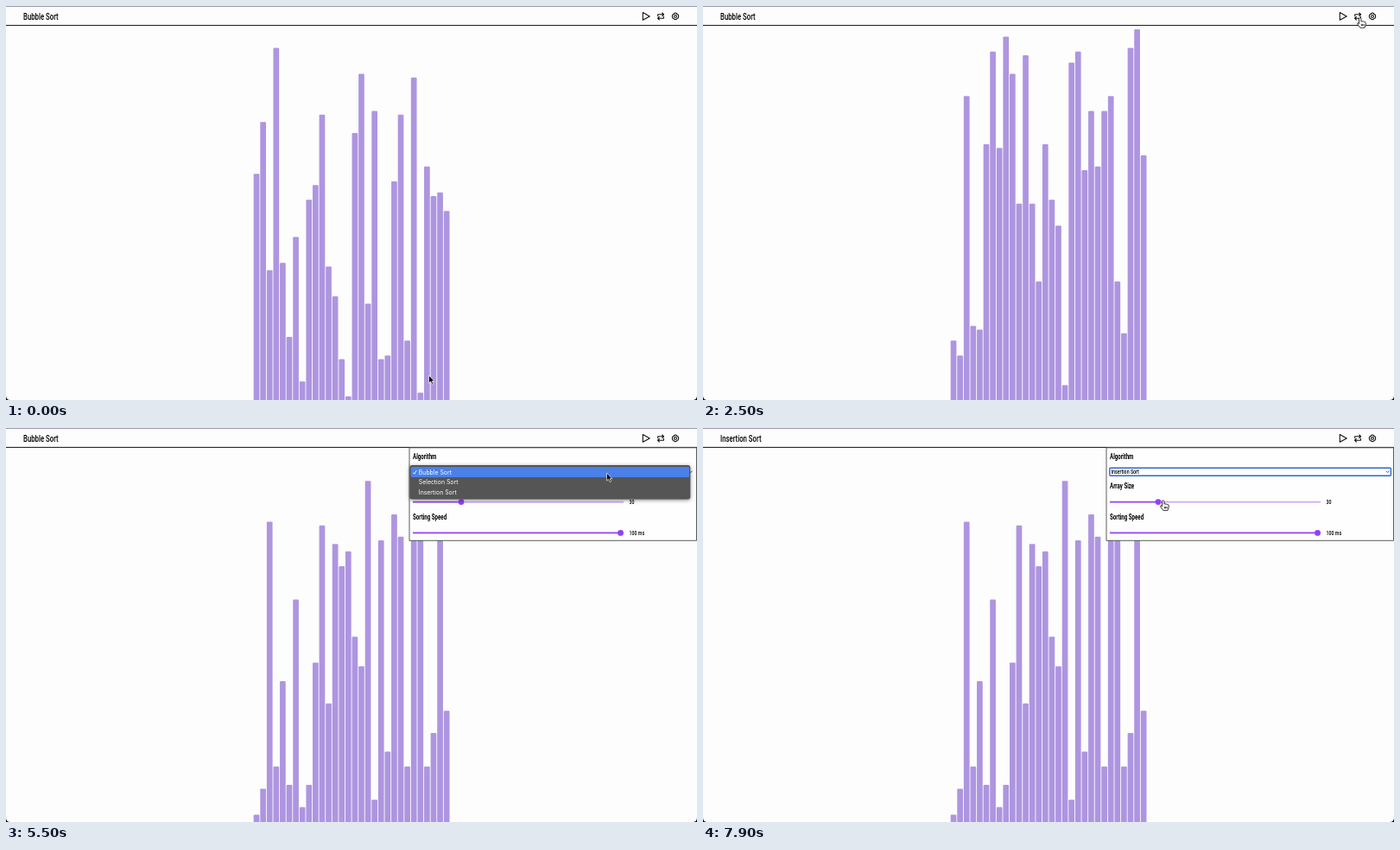
Animation, 800 px wide and 456 px high, one loop 8000 ms. Source, as an HTML page:

```html
<!DOCTYPE html>
<html lang="en">
<head>
<meta charset="utf-8">
<title>Sorting visualizer</title>
<style>
  html, body { margin: 0; width: 100%; height: 100%; overflow: hidden; background: #fdfdfd; }
  svg { display: block; width: 800px; height: 456px; }
  .condensed text { font-family: Roboto, sans-serif; transform-box: fill-box; transform: scaleX(.707); }
  .title { font-size: 11px; font-weight: 500; }
  .label { font-size: 8.7px; font-weight: 700; }
  .value { font-size: 7.5px; font-weight: 500; }
  .icon { fill: none; stroke: #111; stroke-width: 1.1; stroke-linejoin: round; stroke-linecap: round; }
  .track { stroke: #9340f5; stroke-width: 1.8; }
  .rest { stroke: #cfa6fa; }
  .thumb { fill: #9340f5; }
  #menu { font: 6.9px Inter, sans-serif; fill: #fff; filter: drop-shadow(0 1.5px 2px #0007); }
</style>
</head>
<body>
<svg viewBox="0 0 800 456">
  <rect width="800" height="456" fill="#fdfdfd"/>
  <g id="bars" fill="#ae95e0"></g>
  <path d="M0 .5H800" stroke="#9a9ab2"/>
  <path d="M0 22.4H800" stroke="#111"/>
  <g class="condensed"><text id="title" class="title" x="20" y="16">Bubble Sort</text></g>
  <g class="icon">
    <path d="M737.3 7.6V16.2L745.2 11.9Z"/>
    <path d="M754.7 11.6V9.8H761.3M759.8 8l1.8 1.8-1.8 1.7M761.4 12.3V14.2H754.7M756.3 12.5l-1.8 1.7 1.8 1.8"/>
    <path d="M773.6 8.6l1.4-.5 1.4.5.6 1 1.2.4.5 1.9-.5 2-1.2.4-.6 1-1.4.5-1.4-.5-.6-1-1.2-.4-.5-2 .5-1.9 1.2-.4Z"/>
    <circle cx="775" cy="11.9" r="1.4"/>
  </g>

  <g id="panel">
    <path d="M467 22.8H799.5V130.3H467Z" fill="#fefefe" stroke="#333" stroke-width=".8"/>
    <rect id="focus" x="470.8" y="46.2" width="325.6" height="9" rx="1" fill="#fff" stroke="#2f66cf" stroke-width="1.4"/>
    <g class="condensed">
      <text class="label" x="471" y="36">Algorithm</text>
      <text class="label" x="471" y="70">Array Size</text>
      <text class="label" x="471" y="106">Sorting Speed</text>
      <text id="choice" class="value" x="472.5" y="53.4">Bubble Sort</text>
      <text class="value" x="721.5" y="88.3">30</text>
      <text class="value" x="721.5" y="124.2">100 ms</text>
    </g>
    <path d="M791 49.8l1.7 1.7 1.7-1.7" fill="none" stroke="#222" stroke-width=".8"/>
    <path class="track rest" d="M527 85.6H715"/>
    <path class="track" d="M471 85.6H527M471 121.4H715"/>
    <circle class="thumb" cx="527" cy="85.6" r="3.4"/>
    <circle class="thumb" cx="711.5" cy="121.4" r="3.4"/>
  </g>

  <g id="menu">
    <rect x="467.3" y="43" width="325" height="39.5" rx="3" fill="#555"/>
    <rect id="hover" x="468.8" width="322.3" height="11.8" rx="1.5" fill="#4a80e8"/>
    <path d="M471.4 51.6l1.4 1.7 2.4-4.3" fill="none" stroke="#fff" stroke-width=".9"/>
    <text x="477.8" y="53.5">Bubble Sort</text>
    <text x="477.8" y="65.2">Selection Sort</text>
    <text x="477.8" y="76.9">Insertion Sort</text>
  </g>

  <path d="M0 451V456H5Q0 456 0 451ZM800 451V456H795Q800 456 800 451Z"/>
  <g id="cursor" stroke-linejoin="round">
    <path id="arrow" d="M0 0V9L2.1 7.1 3.6 10.5 5.1 9.8 3.6 6.6H6.4Z" stroke="#fff" stroke-width=".7"/>
    <path id="hand" d="M-1.2 1q1.2-1.8 2.4 0V4.4q1.2-.7 1.9.2 1.1-.5 1.8.4 1.6-.3 1.6 1.2V8.5L5.3 11.8H.2L-3 7.6q-.5-1.6 1-1.2L-1.2 7.2ZM1.6 7.4V9.7M3 7.4V9.7M4.4 7.4V9.7" fill="#fff" stroke="#111" stroke-width=".85"/>
  </g>
</svg>
<script>
const LOOP = 8000, STEP = 100, COUNT = 30, FLOOR = 456, UNIT = 4.29;
const $ = id => document.getElementById(id);
const show = (id, on) => $(id).style.display = on ? '' : 'none';

const shuffled = seed => Array.from({ length: COUNT }, (_, i) => {
  const n = Math.sin((i + 1) * 12.9898 + seed * 78.233) * 43758.5453;
  return Math.ceil((n - Math.floor(n)) * 100);
});

// The two arrays that stay on screen; the quick shuffles between them are random
const first = [61, 75, 35, 95, 37, 17, 44, 5, 54, 58, 77, 36, 28, 11, 1, 72, 88, 26, 78, 11, 12, 59, 77, 16, 87, 2, 63, 55, 56, 51];
const last = [2, 9, 81, 15, 38, 10, 60, 4, 10, 43, 80, 32, 75, 69, 73, 50, 42, 92, 6, 76, 19, 83, 77, 15, 83, 76, 15, 24, 91, 30];
const valuesAt = t =>
  t < 2100 ? first :
  t < 2500 ? shuffled(3) :
  t < 2700 ? shuffled(5) :
  t < 3000 ? shuffled(8) : last;

// Cursor moves: start, end, x and y of the tip on arrival
const moves = [
  [700, 1100, 764, 128],
  [1200, 1800, 760.7, 13.4],
  [3200, 3700, 775, 14],
  [4200, 4800, 696, 46.8],
  [5200, 6200, 693.6, 71],
  [6500, 7000, 702, 85],
  [7000, 7900, 532.7, 83.6],
];

function cursorAt(t) {
  let x = 489.5, y = 427.5;
  for (const [start, end, toX, toY] of moves) {
    const u = Math.min(1, Math.max(0, (t - start) / (end - start)));
    const ease = u * u * (3 - 2 * u);
    x += (toX - x) * ease;
    y += (toY - y) * ease;
  }
  return [x, y];
}

const bars = Array.from({ length: COUNT }, (_, i) => {
  const bar = document.createElementNS('http://www.w3.org/2000/svg', 'rect');
  const attrs = { x: 286.7 + i * 7.59, width: 6.7, rx: 1 };
  for (const name in attrs) bar.setAttribute(name, attrs[name]);
  return $('bars').appendChild(bar);
});

function render(t) {
  const values = valuesAt(t);
  bars.forEach((bar, i) => {
    bar.setAttribute('y', FLOOR - values[i] * UNIT);
    bar.setAttribute('height', values[i] * UNIT + 4);
  });

  const chosen = t >= 6400;
  show('panel', t >= 4000);
  show('menu', t >= 5000 && !chosen);
  show('focus', chosen);
  $('title').textContent = $('choice').textContent = chosen ? 'Insertion Sort' : 'Bubble Sort';

  const [x, y] = cursorAt(t);
  const row = y < 57 ? 0 : y < 68.5 ? 1 : 2;
  $('hover').setAttribute('y', 45.1 + row * 11.7);

  const onIcon = y < 19 && (Math.abs(x - 758) < 6 || Math.abs(x - 775) < 6);
  const onSlider = chosen && x < 715 && y > 81 && y < 90;
  show('hand', onIcon || onSlider);
  show('arrow', !(onIcon || onSlider));
  $('cursor').setAttribute('transform', `translate(${x} ${y})`);
}

function frame() {
  render(Math.floor(performance.now() % LOOP / STEP) * STEP);
  requestAnimationFrame(frame);
}
frame();
</script>
</body>
</html>
```
